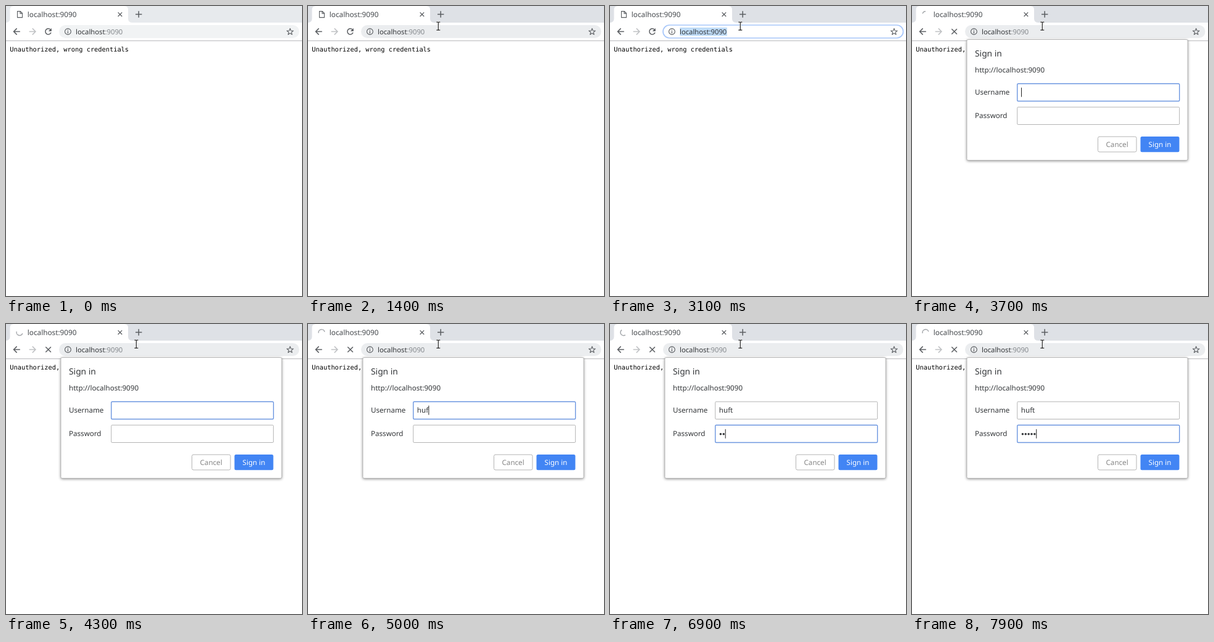
Recreate the animation shown at these times as an HTML page. Size 480x471 px, loop 8 s.

```html
<!DOCTYPE html>
<html lang="en">
<head>
<meta charset="utf-8">
<title>Sign in</title>
<style>
html, body { margin: 0; width: 100%; height: 100%; overflow: hidden; background: #fff; }
svg { display: block; width: 480px; height: 471px; }
text { font-family: "Noto Sans", sans-serif; font-size: 11.6px; fill: #333639; text-rendering: geometricPrecision; white-space: pre; }
.mono { font: 10.34px "DejaVu Sans Mono", monospace; fill: #000; }
.line { fill: none; stroke: #5a5d61; stroke-width: 1.5; }
.field { fill: #fff; stroke: #b4b4b4; stroke-width: 1; }
.field.on { stroke: #6c96e0; stroke-width: 1.4; }
#panel { filter: drop-shadow(0 1px 2px rgba(0, 0, 0, .45)); }
</style>
</head>
<body>
<svg viewBox="0 0 480 471">
  <defs>
    <path id="bar-shape" d="M-3 -6.5H-1Q0 -6.5 0 -5.5V5.5Q0 6.5 -1 6.5H-3M3 -6.5H1Q0 -6.5 0 -5.5V5.5Q0 6.5 1 6.5H3"/>
  </defs>
  <rect width="480" height="471" fill="#fff"/>
  <rect id="strip" width="480" height="27"/>
  <path d="M0 27Q6.5 27 6.5 20.5V6Q6.5 0 12.5 0H192Q198 0 198 6V20.5Q198 27 204.5 27Z" fill="#fff"/>
  <path id="page" class="line" style="stroke-width:1.1" d="M18.5 8.6H23.3L26.5 11.8V18.6H18.5ZM23 8.8V12.1H26.3"/>
  <path id="spin" fill="none" stroke="#a4a7ab" stroke-width="1.5"/>
  <text x="34.8" y="17.6" style="font-size:11.75px;fill:#45494d">localhost:9090</text>
  <path class="line" style="stroke-width:1.3" d="M181.6 10.4l6.6 6.6m0-6.6l-6.6 6.6"/>
  <path class="line" d="M210 13.5H220.4M215.2 8.3V18.7"/>

  <path class="line" d="M22.8 41.5H12.6M17.6 36.4L12.5 41.5L17.6 46.6"/>
  <path class="line" style="stroke:#bfc1c4" d="M37.6 41.5H47.8M42.8 36.4L47.9 41.5L42.8 46.6"/>
  <g id="reload">
    <path class="line" d="M72 38.2A4.7 4.7 0 1 0 73 43.1"/>
    <path d="M73.8 36V41H68.8Z" fill="#5a5d61"/>
  </g>
  <path id="stop" class="line" d="M64.3 37.2l8.6 8.6m0-8.6l-8.6 8.6"/>
  <rect id="bar" x="86" y="31" width="389.5" height="21" rx="10.5"/>
  <rect id="ring" x="86" y="31" width="389.5" height="21" rx="10.5" fill="#fff" stroke="#a8c7fa" stroke-width="1.7"/>
  <rect id="sel" x="113.3" y="35" width="76.5" height="13.5" fill="#bfdcf8"/>
  <circle class="line" cx="100.4" cy="41.5" r="4.9" style="stroke-width:1.1"/>
  <path class="line" style="stroke-width:1.2" d="M100.4 40.8V44.4M100.4 38.6V39.8"/>
  <text x="113" y="45.6" style="font-size:11.25px">localhost<tspan id="port">:9090</tspan></text>
  <path id="star" class="line" style="stroke-width:1.1;stroke-linejoin:round"/>
  <rect y="56" width="480" height="1" fill="#b9babc"/>
  <text class="mono" x="6.3" y="74.4">Unauthorized, wrong credentials</text>

  <g id="dialog">
    <rect id="panel" x="89" y="54.5" width="358" height="196" rx="2" fill="#fff" stroke="#a9a9a9" stroke-width=".7"/>
    <text x="102" y="82" style="font-size:13.8px">Sign in</text>
    <text x="102" y="107.5">http://localhost:9090</text>
    <text x="102" y="144.4">Username</text>
    <text x="102" y="182.4">Password</text>
    <rect id="user" class="field" x="170.7" y="126.2" width="263" height="28.3" rx="1.5"/>
    <rect id="pass" class="field" x="170.7" y="164.2" width="263" height="28.3" rx="1.5"/>
    <text id="name" x="176.8" y="144.4"></text>
    <g id="dots" fill="#333639"></g>
    <rect id="caret" width="1" height="15" fill="#222"/>
    <rect class="field" x="301.5" y="212.2" width="62.5" height="24.8" rx="2.5"/>
    <text x="332.6" y="228.8" text-anchor="middle" style="fill:#858585">Cancel</text>
    <rect x="370.5" y="212" width="63" height="25.3" rx="2.5" fill="#4285f4"/>
    <text x="402" y="228.8" text-anchor="middle" style="fill:#fff">Sign in</text>
  </g>

  <g id="beam" fill="none">
    <use href="#bar-shape" stroke="#fff" stroke-width="2.6"/>
    <use href="#bar-shape" stroke="#222" stroke-width="1.2"/>
  </g>
  <path id="arrow" d="M0 0V13L3 10.2L5 14.6L7 13.7L5.1 9.5H9.2Z" fill="#111" stroke="#fff" stroke-width=".9"/>
</svg>
<script>
const $ = id => document.getElementById(id);
const show = (id, on) => $(id).style.display = on ? '' : 'none';
const put = (id, x, y) => $(id).setAttribute('transform', `translate(${x} ${y})`);

const LOOP = 8000, STEP = 100;
const FOCUS = 900, CLICK = 2600, LOAD = 3400, DIALOG = 3500, TAB = 5700;
const NAME = 'huft', NAME_KEYS = [4600, 4800, 5000, 5200];
const PASS_KEYS = [6600, 6900, 7100, 7400, 7700];
const PATH = [[900, 447, 152], [1000, 390, 122], [1100, 302, 76], [1200, 236, 42], [1300, 211.3, 32.6]];
const TURN = [[3400, 90], [3700, 165], [5000, 550], [6000, 800], [8000, 1300]];

const typed = (keys, t) => keys.filter(k => k <= t).length;

function mix(points, t) {
  let i = 1;
  while (i < points.length - 1 && points[i][0] < t) i++;
  const a = points[i - 1], b = points[i];
  const k = Math.min(1, Math.max(0, (t - a[0]) / (b[0] - a[0])));
  return a.slice(1).map((v, j) => v + (b[j + 1] - v) * k);
}

// Trailing end waits at twelve o'clock for the first half turn.
function arc(t) {
  const end = mix(TURN, t)[0], start = Math.max(90, end - 180);
  const at = deg => {
    const a = deg * Math.PI / 180;
    return `${(22 + 5 * Math.cos(a)).toFixed(2)} ${(13.7 - 5 * Math.sin(a)).toFixed(2)}`;
  };
  return `M${at(start)}A5 5 0 0 0 ${at(end)}`;
}

function draw(t) {
  const loading = t >= LOAD, editing = t >= CLICK && !loading;
  $('strip').setAttribute('fill', t < FOCUS ? '#e7eaed' : '#dee1e6');
  $('bar').setAttribute('fill', t < 1300 ? '#f1f3f4' : '#ebedef');
  show('ring', editing);
  show('sel', editing);
  $('port').style.fill = editing ? '#333639' : '#85898d';
  show('reload', !loading);
  show('stop', loading);
  show('page', !loading);
  show('spin', loading);
  if (loading) $('spin').setAttribute('d', arc(t));

  const [x, y] = mix(PATH, t), inBar = y < 52;
  show('beam', t >= FOCUS && inBar);
  show('arrow', t >= FOCUS && !inBar);
  put('beam', x, y);
  put('arrow', x, y);

  show('dialog', t >= DIALOG);
  if (t < DIALOG) return;
  const n = typed(NAME_KEYS, t), p = typed(PASS_KEYS, t), second = t >= TAB;
  $('name').textContent = NAME.slice(0, n);
  $('user').classList.toggle('on', !second);
  $('pass').classList.toggle('on', second);
  [...$('dots').children].forEach((dot, i) => dot.style.display = i < p ? '' : 'none');
  const w = second ? p * 4.85 : n ? $('name').getComputedTextLength() : 0;
  put('caret', 177 + w, second ? 170.8 : 132.6);
  const last = Math.max(...[DIALOG, TAB, ...NAME_KEYS, ...PASS_KEYS].filter(k => k <= t));
  show('caret', (t - last) % 1000 < 500);
}

$('star').setAttribute('d', 'M' + Array.from({ length: 10 }, (_, i) => {
  const a = i * Math.PI / 5, r = i % 2 ? 2.3 : 5.5;
  return `${460.7 + r * Math.sin(a)} ${41.9 - r * Math.cos(a)}`;
}).join('L') + 'Z');
$('dots').innerHTML = PASS_KEYS.map((_, i) => `<circle cx="${179.4 + i * 4.85}" cy="178.8" r="1.75"/>`).join('');

function tick() {
  draw(Math.floor(performance.now() % LOOP / STEP) * STEP);
  requestAnimationFrame(tick);
}
tick();
</script>
</body>
</html>
```
